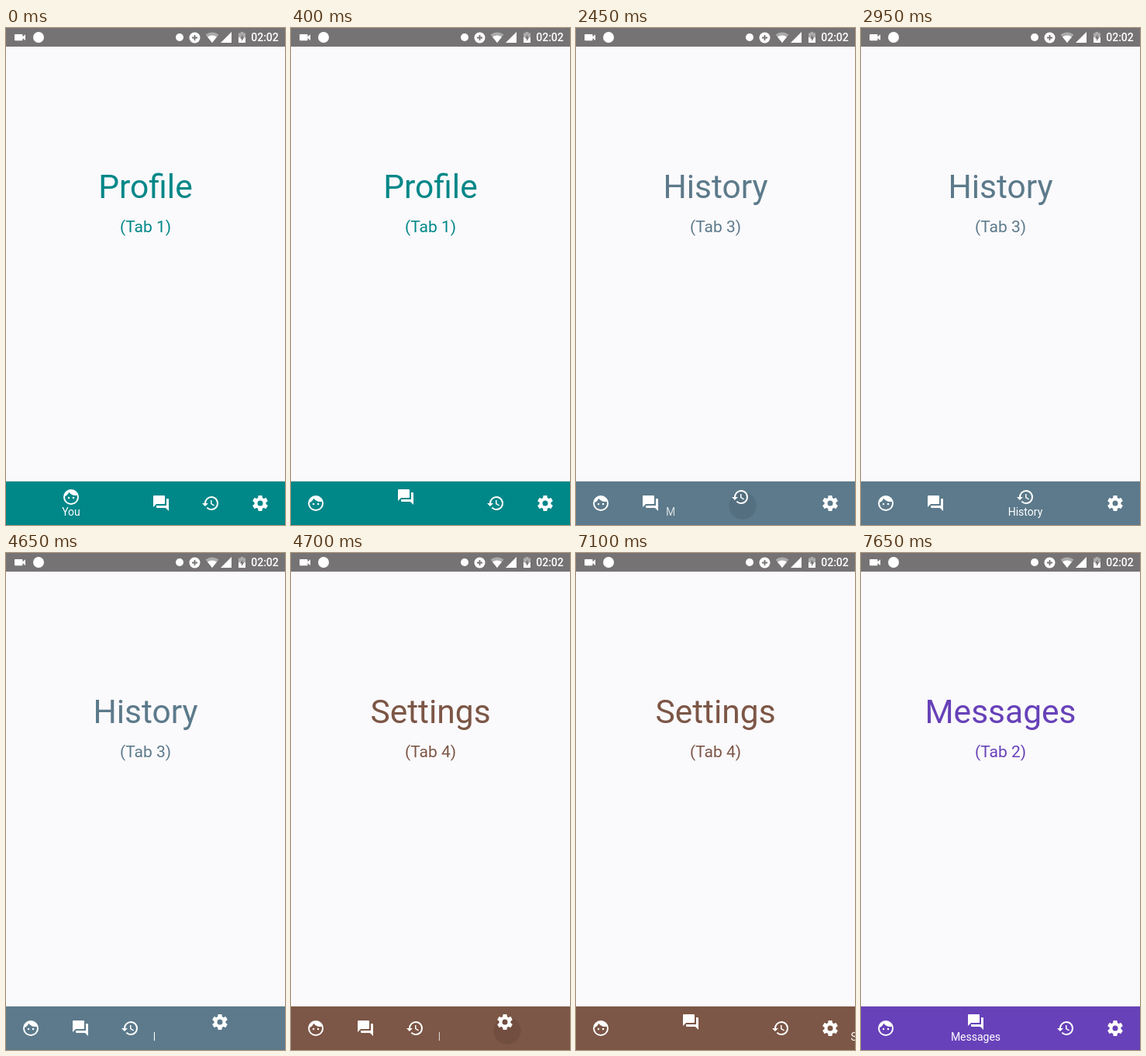
An HTML page for the animation above (8 s loop, 360 by 640 pixels).

```html
<!DOCTYPE html>
<html lang="en">
<head>
<meta charset="utf-8">
<title>Bottom navigation</title>
<style>
  html, body { margin: 0; width: 100%; height: 100%; overflow: hidden; background: #faf9fb; }
  #stage { display: block; width: 360px; height: 640px; }
  text { font-family: Roboto, "Noto Sans", sans-serif; text-anchor: middle; }
</style>
</head>
<body>
<svg id="stage" viewBox="0 0 360 640">
  <defs>
    <path id="face" fill="#fff" d="M9 11.75a1.25 1.25 0 100 2.5 1.25 1.25 0 000-2.5zm6 0a1.25 1.25 0 100 2.5 1.25 1.25 0 000-2.5zM12 2a10 10 0 100 20 10 10 0 000-20zm0 18c-4.41 0-8-3.59-8-8 0-.29.02-.58.05-.86 2.36-1.05 4.23-2.98 5.21-5.37C11.07 8.33 14.05 10 17.42 10c.78 0 1.53-.09 2.25-.26.21.71.33 1.47.33 2.26 0 4.41-3.59 8-8 8z"/>
    <path id="chat" fill="#fff" d="M21 6h-2v9H6v2a1 1 0 001 1h11l4 4V7a1 1 0 00-1-1zm-4 6V3a1 1 0 00-1-1H3a1 1 0 00-1 1v14l4-4h10a1 1 0 001-1z"/>
    <path id="clock" fill="#fff" d="M13 3a9 9 0 00-9 9H1l3.89 3.89.07.14L9 12H6a7 7 0 117 7c-1.93 0-3.68-.79-4.94-2.06l-1.42 1.42A9 9 0 1013 3zm-1 5v5l4.28 2.54.72-1.21-3.5-2.08V8H12z"/>
    <path id="tooth" fill="#fff" d="M-2-10h4q.4 0 .5.4l.5 3.6h-6l.5-3.6q.1-.4.5-.4z"/>
    <g id="gear">
      <g id="teeth" transform="translate(12 12)"></g>
      <circle cx="12" cy="12" r="5.5" fill="none" stroke="#fff" stroke-width="4"/>
    </g>
  </defs>

  <rect width="360" height="640" fill="#faf9fb"/>

  <!-- status bar -->
  <rect width="360" height="24" fill="#767375"/>
  <g fill="#fff">
    <path d="M12 8h8.500q1 0 1 1v2.300l3.500-3v7.600l-3.500-3v2.300q0 1-1 1H12q-1 0-1-1V9q0-1 1-1z"/>
    <circle cx="42" cy="12" r="7"/>
    <circle cx="224" cy="12" r="5"/>
    <circle cx="243.500" cy="12.500" r="7"/>
    <path d="M243.500 9v7M240 12.500h7" stroke="#767375" stroke-width="1.800"/>
    <path d="M257.500 8.500Q266 2.500 274.500 8.500L266 19z" opacity=".4"/>
    <path d="M260 11.500Q266 7.500 272 11.500L266 19z"/>
    <path d="M291 5v14h-14z"/>
    <path d="M300 6.500h2.700V5h3.600v1.500h2.700V12h-9z" opacity=".4"/>
    <path d="M300 12h9v7h-9z"/>
    <path d="M305.300 8.500l-3.300 5h2v3.500l3.300-5h-2z" fill="#767375"/>
    <text x="334" y="17" font-size="14" font-weight="500">02:02</text>
  </g>

  <text id="title" x="180" y="219" font-size="42.5"></text>
  <text id="sub" x="180" y="263" font-size="21"></text>

  <rect y="583" width="360" height="1" fill="#000" opacity=".1"/>
  <svg id="bar" y="584" width="360" height="56">
    <rect id="fill" width="360" height="56"/>
    <circle id="ripple" cy="31"/>
  </svg>
</svg>
<script>
const NS = 'http://www.w3.org/2000/svg';
const $ = id => document.getElementById(id);
const clamp = v => Math.max(0, Math.min(1, v));

function add(parent, name, attrs) {
  const node = document.createElementNS(NS, name);
  set(node, attrs);
  return parent.appendChild(node);
}
function set(node, attrs) {
  for (const key in attrs) node.setAttribute(key, attrs[key]);
}

for (let a = 0; a < 360; a += 60)
  add($('teeth'), 'use', { href: '#tooth', transform: `rotate(${a})` });

const tabs = [
  { icon: 'face', label: 'You', title: 'Profile', color: '#008788' },
  { icon: 'chat', label: 'Messages', color: '#6741b9' },
  { icon: 'clock', label: 'History', color: '#5c7a8b' },
  { icon: 'gear', label: 'Settings', color: '#7c5646' }
];
for (const tab of tabs) {
  // the nested svg clips the label when its tab is narrow
  tab.box = add($('bar'), 'svg', { height: 56 });
  tab.glyph = add(tab.box, 'use', { href: '#' + tab.icon });
  tab.text = add(tab.box, 'text', { x: 84, y: 44, 'font-size': 14, fill: '#fff' });
  tab.text.textContent = tab.label;
}

// lead: how far the switch has already run when it shows up
const switches = [
  { at: 400, from: 0, to: 1, lead: 0 },
  { at: 2450, from: 1, to: 2, lead: 50 },
  { at: 4650, from: 2, to: 3, lead: 0 },
  { at: 7100, from: 3, to: 1, lead: 0 }
];
const LOOP = 8000, STEP = 50, WIDE = 168, NARROW = 64;

function draw(t) {
  let now = { from: 0, to: 0, at: -LOOP, lead: 0 };
  for (const s of switches) if (t >= s.at) now = s;
  const age = t - now.at + now.lead;

  let x = 0;
  tabs.forEach((tab, i) => {
    const active = i === now.to;
    const width = active ? WIDE : NARROW;
    const shown = active ? clamp((age - 50) / 200)
      : i === now.from ? 1 - clamp(age / 200) : 0;
    set(tab.box, { x, width });
    set(tab.glyph, { x: width / 2 - 12, y: active ? 8 : 16 });
    set(tab.text, { opacity: shown });
    x += width;
  });

  const page = tabs[age < 50 ? now.from : now.to];
  $('title').textContent = page.title || page.label;
  $('sub').textContent = `(Tab ${tabs.indexOf(page) + 1})`;
  for (const id of ['title', 'sub', 'fill']) set($(id), { fill: page.color });

  const grow = clamp(age / 450);
  set($('ripple'), {
    cx: now.to * NARROW + WIDE / 2 + 3,
    r: WIDE / 2 * (1 - (1 - grow) ** 2),
    opacity: 0.09 * (1 - clamp((age - 200) / 350))
  });
}

function tick() {
  const t = performance.now() % LOOP;
  draw(Math.floor(t / STEP) * STEP);
  requestAnimationFrame(tick);
}
tick();
</script>
</body>
</html>
```
